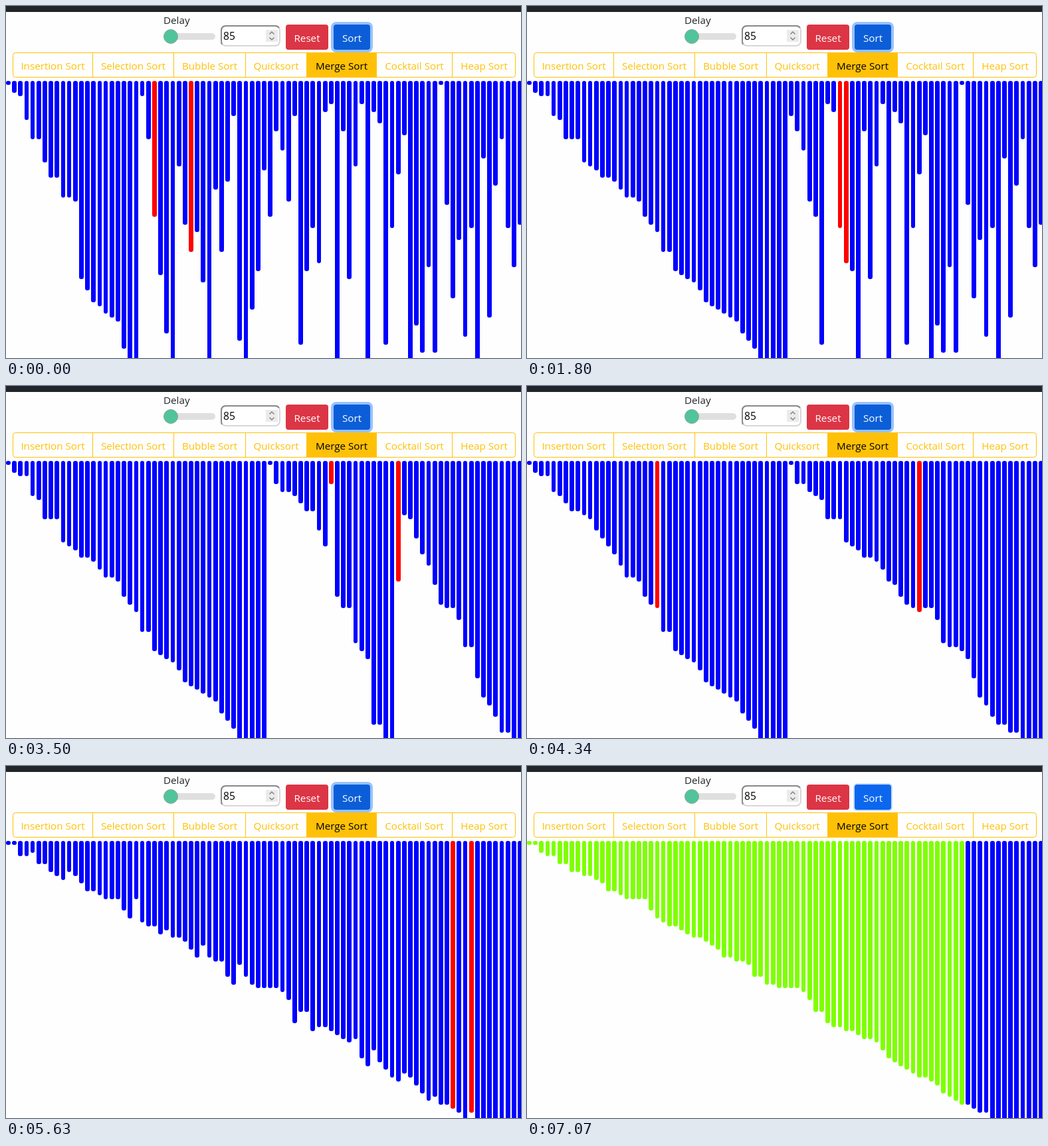
An HTML page with a canvas that plays this animation: 775x531 px, repeating every 7170 ms.

```html
<!DOCTYPE html>
<html lang="en">
<head>
<meta charset="utf-8">
<title>Merge Sort</title>
<style>
  html, body { margin: 0; width: 100%; height: 100%; overflow: hidden; background: #fefefe; }
  canvas, svg { position: absolute; left: 0; top: 0; }
  text { font: 15.2px "Open Sans", "Noto Sans", sans-serif; fill: #212529; }
  .mid { text-anchor: middle; }
  .light { fill: #fff; }
</style>
</head>
<body>
<canvas id="stage" width="775" height="531"></canvas>
<svg id="controls" width="775" height="531" viewBox="0 0 775 531">
  <rect width="775" height="9" fill="#212529"/>
  <text x="237" y="27">Delay</text>
  <rect x="237" y="41" width="78" height="10" rx="5" fill="#dfdfdf"/>
  <circle cx="248" cy="46" r="10.5" fill="#50c49a" stroke="#8aa59b"/>
  <g fill="none" stroke-width="2">
    <rect x="324" y="30" width="88" height="30" rx="7" fill="#fff" stroke="#d9d5d9"/>
    <path d="M325 58Q324 56 324 53V37Q324 30 331 30H405Q409 30 411 33" stroke="#8b878b"/>
  </g>
  <text x="327" y="51" style="font-size:15.6px;fill:#000">85</text>
  <rect x="391" y="36" width="18" height="18" fill="#ebebeb"/>
  <path d="M396.500 42.500l3.500-3.500 3.500 3.500M396.500 47.500l3.500 3.500 3.500-3.500" fill="none" stroke="#808080" stroke-width="1.400"/>
  <rect x="421" y="28" width="64" height="38" rx="4" fill="#dc3545"/>
  <text class="mid light" x="453" y="54">Reset</text>
  <rect id="ring"/>
  <rect id="sort" x="493" y="28" width="55" height="38" rx="4"/>
  <text class="mid light" x="520.500" y="54">Sort</text>
  <rect x="10.500" y="70.500" width="756" height="37" rx="4" fill="none" stroke="#ffc107"/>
</svg>
<script>
const byId = id => document.getElementById(id);
const ctx = byId('stage').getContext('2d');

// Algorithm tabs
const edges = [10, 130, 252, 360, 452, 557, 671, 767];
const names = ['Insertion Sort', 'Selection Sort', 'Bubble Sort', 'Quicksort', 'Merge Sort', 'Cocktail Sort', 'Heap Sort'];
byId('controls').insertAdjacentHTML('beforeend', names.map((name, i) => {
  const x = edges[i], on = name === 'Merge Sort';
  return (on ? `<rect x="${x}" y="70" width="106" height="38" fill="#ffc107"/>` : '') +
    (i ? `<path d="M${x + .5} 70V108" stroke="#ffc107"/>` : '') +
    `<text class="mid" x="${(x + edges[i + 1] + 1) / 2}" y="96" style="fill:${on ? '#000' : '#ffc107'}">${name}</text>`;
}).join(''));

const start = [
  1, 3, 4, 10, 15, 15, 21, 25, 25, 30, 30, 31, 51, 54, 57, 58, 60, 61, 62, 69, 78, 95,
  22, 37, 44, 50, 65, 82, 4, 15, 35, 39, 52, 88, 28, 44, 26, 9, 67, 100, 59, 49, 23,
  35, 13, 18, 31, 9, 68, 49, 38, 47, 8, 6, 85, 13, 51, 22, 6, 98, 8, 11, 68, 38,
  24, 14, 74, 63, 70, 48, 70, 1, 32, 56, 41, 66, 38, 92, 20, 61, 27, 15, 38, 48, 37
];

// In-place merge sort with shrinking gaps; every swap is one step
const steps = [], stepAt = {};
const work = [...start];

function merge(lo, hi) {
  let gap = hi - lo + 1;
  while (gap > 1) {
    gap = Math.ceil(gap / 2);
    for (let i = lo, j = lo + gap; j <= hi; i++, j++) {
      stepAt[[lo, hi, i, j]] = steps.length;
      if (work[i] > work[j]) {
        [work[i], work[j]] = [work[j], work[i]];
        steps.push({ bars: [...work], red: [i, j], green: 0 });
      }
    }
  }
}

function sort(lo, hi) {
  if (lo >= hi) return;
  const mid = (lo + hi) >> 1;
  sort(lo, mid);
  sort(mid + 1, hi);
  merge(lo, hi);
}

sort(0, start.length - 1);
const swaps = steps.length;
start.forEach((_, i) => steps.push({ bars: work, red: [], green: i + 1 }));

// Pace: [tick, step], linear in between
const pace = [
  [0, stepAt['22,32,24,30']],
  [33, stepAt['0,42,5,11']],
  [87, stepAt['73,74,73,74']],
  [116, stepAt['43,84,53,64']],
  [169, stepAt['0,84,60,71']],
  [209, swaps + 18],
  [235, swaps + 71]
];
const LAST = 235, LOOP = 7170;

function tickAt(t) {
  const tick = t < 2450 ? Math.min(80, t / 30) : (t - 20) / 30;
  return Math.min(LAST, Math.floor(tick + 1e-6));
}

function stepFor(tick) {
  const n = Math.max(1, pace.findIndex(p => p[0] >= tick));
  const [t0, s0] = pace[n - 1], [t1, s1] = pace[n];
  return steps[Math.round(s0 + (s1 - s0) * (tick - t0) / (t1 - t0))];
}

function setRing(spread, color, fill) {
  const attrs = {
    x: 493 - spread, y: 28 - spread, width: 55 + 2 * spread, height: 38 + 2 * spread,
    rx: 4 + spread, fill: color
  };
  for (const key in attrs) byId('ring').setAttribute(key, attrs[key]);
  byId('sort').setAttribute('fill', fill);
}

function draw(tick) {
  const { bars, red, green } = stepFor(tick);
  ctx.clearRect(0, 0, 775, 531);
  bars.forEach((value, i) => {
    const x = Math.round(i * 9.168), right = Math.round(i * 9.168 + 6.8);
    ctx.fillStyle = red.includes(i) ? '#f00' : i < green ? '#7fff00' : '#00f';
    ctx.beginPath();
    ctx.roundRect(x, 113, right - x, Math.round(value * 5.855), 3.3);
    ctx.fill();
  });
  if (tick === LAST) setRing(2, '#c4dcfd', '#0c67ee');
  else setRing(4, '#98c1fe', '#0b5ed7');
}

const begin = performance.now();
let shown = -1;
function frame() {
  const tick = tickAt((performance.now() - begin) % LOOP);
  if (tick !== shown) draw(shown = tick);
  requestAnimationFrame(frame);
}
frame();
</script>
</body>
</html>
```
